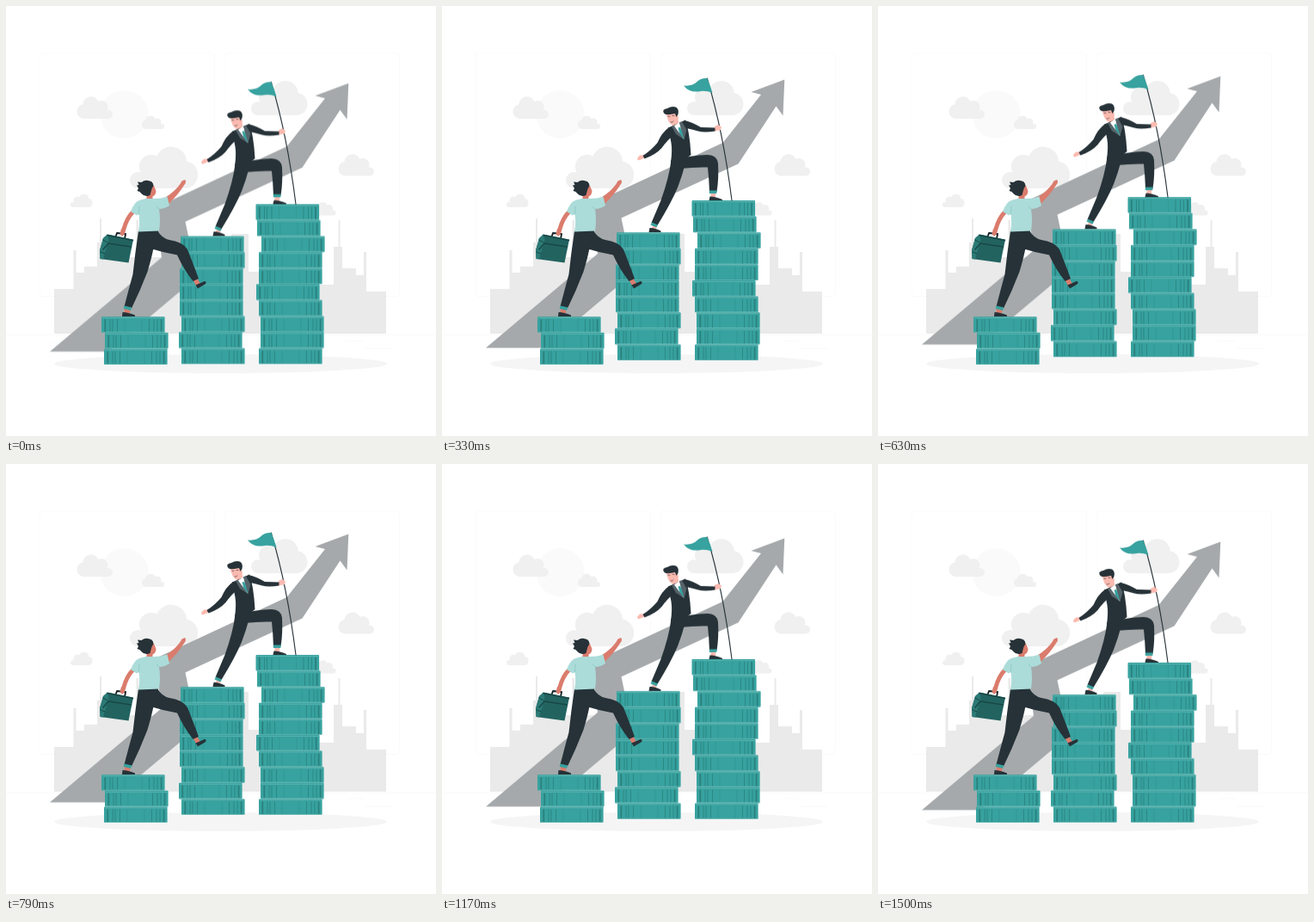
Recreate the animation shown at these times as an HTML page. Size 500 px wide and 500 px high, loop 1540 ms.

```html
<!DOCTYPE html>
<html lang="en">
<head>
<meta charset="utf-8">
<title>Climbing together</title>
<style>
  html, body { margin: 0; width: 100%; height: 100%; overflow: hidden; background: #fff; }
  svg { display: block; width: 100vw; height: 100vh; }
  .dark { fill: #263238; }
  .teal { fill: #37a29f; }
  .fair { fill: #fbbab0; }
  .tan { fill: #da7c6d; }
  .line { fill: none; stroke-linecap: round; stroke-linejoin: round; }
</style>
</head>
<body>
<svg viewBox="0 0 500 500">
  <defs>
    <path id="cloud" d="M9.5 49a9.5 9.5 0 0 1 0-19l3 .5a14 14 0 0 1 19-19a18 18 0 0 1 34.5 6a16 16 0 0 1 0 31.5z"/>
    <g id="coin">
      <rect width="73.6" height="18.6" rx="1" fill="#37a29f"/>
      <path d="M.6 1.5H73M.6 18H73" stroke="#62b5b2" stroke-width=".8"/>
      <path d="M4.3 3V17.5M69.6 3V17.5" stroke="#2a807d" stroke-width="1.8"/>
      <path d="M10 3V17.5M13 3V17.5M18.5 3V17.5M55.5 3V17.5M61 3V17.5M65 3V17.5" stroke="#2c8582" stroke-width=".9"/>
      <path d="M27 3V17.5M47 3V17.5" stroke="#329592" stroke-width=".7"/>
    </g>
  </defs>

  <!-- room and skyline -->
  <g fill="none" stroke="#ebebeb" stroke-width=".25">
    <rect x="39" y="55" width="203.5" height="282.5" rx="3"/>
    <rect x="255" y="55" width="202.5" height="282.5" rx="3"/>
    <path d="M0 382.5H500M396 389.5H416M417 398.5H450M52 391H96M131 395H225"/>
  </g>
  <circle cx="137.5" cy="126" r="28" fill="#fafafa"/>
  <path fill="#eaeaea" d="M56 381V329H78.5V284H81.5V310H91V303H106V275H109V247H111V275H126V292H151.5V249H154V292H200V300H262V265H282V309H295V324H381V280H386.5V249H388.5V280H391V305H407V313H416V286H419V332H442V381z"/>
  <g id="clouds" fill="#f0f0f0"></g>
  <ellipse cx="249.5" cy="416" rx="193.5" ry="11" fill="#f5f5f5"/>

  <g id="lift">
    <path fill="#a5a9ab" d="M51 402.5L181 293L173 235.5L326.500 164L371 108L359.500 105L398.300 90.500L396.500 132.500L388.500 121.500L344.500 188.500L208.500 251.500L222 316L119 402.500z"/>
    <g id="tall"></g>

    <!-- flag -->
    <path class="line" stroke="#263238" stroke-width="1.1" d="M308.3 89Q327 151 337 231"/>
    <path class="teal" d="M281 97.500Q291 98.500 296.500 93Q301 88.500 308.300 89Q312 97 314.500 106Q306 102.500 298 104.500Q287 105.500 281 97.500z"/>

    <!-- leader -->
    <path class="fair" d="M235 178.500L230 178.500L227 182Q227 185 230 184L236 181.500zM317 145L321 143L325 145.500L324 149L317 150.500z"/>
    <path class="fair" d="M267 139L274 136L277 145L273 148L269 145zM245.500 257H250.500L249 264H244zM312.500 221H318.500L318 228H312.500z"/>
    <path class="dark" d="M266.500 184Q264 205 254.500 231L243.500 257L250.500 260Q267 233 274 216Q279 203 283 188z"/>
    <path class="dark" d="M268 185Q290 178 309 178Q320 178.500 321 188Q322 206 319.500 221H311Q310.500 206 309 192.500Q295 192 277 194z"/>
    <path class="teal" d="M244 256.500L251 259.500L249.500 262.500L242.500 259.500zM310.800 219.500H319.800L319.300 223H310.800z"/>
    <path class="dark" d="M240.500 268L241.500 263Q247 262.500 254.500 266.500V268zM310.500 231L311.500 226.500Q317 226 326 230V231z"/>
    <path class="dark" d="M263 146.500L271 143L283 137.500Q288 151 289.500 178Q281 186.500 266 187Q268 173 266.500 164z"/>
    <path fill="#fff" d="M269 145L276 140L281.500 160Q274 154 269 145z"/>
    <path class="teal" d="M274.500 146.500L277 146L280.500 152L281.500 160L276.500 154z"/>
    <path fill="#56636a" d="M267 145L270 144.500L281.500 160L272 154zM276 140L279 139.500L284.500 149L281.500 160z"/>
    <path class="dark" d="M264 146Q255.500 152 250.500 164Q243 173 233.500 179L235.500 182.500Q249 177.500 255.500 170Q262 161 268.500 156z"/>
    <path class="dark" d="M282 138Q291 140 301 146L317.500 146.500V150.500Q305 152.500 298 150.500Q290 148 284 147z"/>
    <path class="fair" d="M260.500 129L272.500 127.500L275 135Q274 143 268 143.500Q262.500 141 260.500 129z"/>
    <path class="dark" d="M260 131Q256.500 129 257.500 126Q259 124.500 262 124Q267 121 272 122.500Q276 125 274.500 131L272.500 134L271 130Q266 131.500 260 131z"/>
    <path class="line" stroke="#263238" stroke-width=".6" d="M263 133.300H265M268 132.500H270M266 140Q268 140.500 269 139"/>
  </g>

  <g id="short"></g>

  <!-- climber -->
  <path class="tan" d="M164 217L171 217L170 228L163 228zM138 350H145L144 357H137.500zM217 318L222 316L226 323L221 325z"/>
  <path class="tan" d="M186 222Q196 216 202.500 207L204.500 203.500L208 202Q210.500 204.500 207 208.500Q199 221 189 230z"/>
  <path class="dark" d="M154 261.500L177 261Q177 274 171 284Q169 294 164.500 309Q156 331 146 351.500L137.500 349.500Q142 332 147.500 312Q150 288 154 261.500z"/>
  <path class="dark" d="M158 261.500L176 261Q181 270 190 272Q205 274 211 283Q217 298 224 317L217.500 320Q207 307 199 289.500Q184 287 168 282z"/>
  <path class="teal" d="M137.500 348.500L146.300 350.500L145 354L136.800 352z"/>
  <path class="dark" d="M135 361L135.500 356Q142 356 150 359.500V361zM220.500 324.500L231 320Q234 321 231.500 323.500L223 328.500z"/>

  <path class="line" stroke="#182327" stroke-width="1.900" d="M127 270L129 264L139 265L138 271"/>
  <path fill="#226360" d="M118 265.500L148 271.500L142.500 298.500L109.500 294L109 284L113 270z"/>
  <path fill="#2b7a76" d="M118 265.500L113 270L109 284L109.500 294L113 294.500L119.500 272z"/>
  <path class="line" stroke="#184745" stroke-width="1.400" d="M118 266.500L147.500 272.500M113 283L119 276L145.500 280"/>
  <path class="line" stroke="#184745" stroke-width="1" d="M110 286L115 288M113 272L118 275"/>
  <path class="line" stroke="#da7c6d" stroke-width="5" d="M148 239Q140 247 136.500 261"/>
  <path class="tan" d="M134 259L139 260L138 265L135 268L132.500 265z"/>
  <path fill="#acdcd9" d="M162 224L171 224Q181 224 187.500 221.500L190 232Q184 236 178 236Q180 249 178 261.500L154 262.500Q156 252 154.500 242L152 243.500L145 239Q149 228 155 226z"/>
  <path class="line" stroke="#86c6c2" stroke-width=".8" d="M155 233L154.500 242M178 236L175 233"/>
  <path class="tan" d="M164 208L172 209L174.500 215Q174 221 169.500 221.500L163 219z"/>
  <path class="dark" d="M155.500 216L152.500 215L154 212L152 208.500L154.500 208L153 204.500L157.500 205Q162 201.500 167 203.500Q171 204 171.500 209L169.500 212.500L168.500 216L167.500 220Q161 223 155.500 216z"/>
</svg>
<script>
  const PERIOD = 1540, LEAD = 50, RISE = 10;
  const PITCH = 18.6, FLOOR = 417;

  function place(id, href, transform) {
    const use = document.createElementNS('http://www.w3.org/2000/svg', 'use');
    use.setAttribute('href', href);
    use.setAttribute('transform', transform);
    document.getElementById(id).append(use);
  }

  // Left edges of the coins, bottom to top.
  function stack(id, lefts) {
    lefts.forEach((x, i) => place(id, '#coin', `translate(${x} ${FLOOR - PITCH * (i + 1)})`));
  }

  function cloud(x, y, w, h, flip) {
    const sx = w / 82, sy = h / 49;
    place('clouds', '#cloud', `translate(${flip ? x + w : x} ${y}) scale(${flip ? -sx : sx} ${sy})`);
  }

  cloud(81, 105, 43, 26, true);
  cloud(157, 127.5, 27, 15.5, true);
  cloud(144, 163, 82, 49);
  cloud(285, 86.5, 68, 40.5);
  cloud(385, 172, 43, 25.5, true);
  cloud(75, 218.5, 26.5, 15.5);
  cloud(358, 228, 25.5, 15.5, true);

  stack('short', [114, 115, 111]);
  stack('tall', [204, 201, 204, 202, 202, 202, 204, 203]);
  stack('tall', [294, 296, 296, 294, 291, 294, 294, 297, 292, 290.5]);

  document.getElementById('lift').animate(
    [0, -RISE, 0].map(y => ({ transform: `translateY(${y}px)` })),
    { duration: PERIOD, delay: -LEAD, iterations: Infinity }
  );
</script>
</body>
</html>
```
